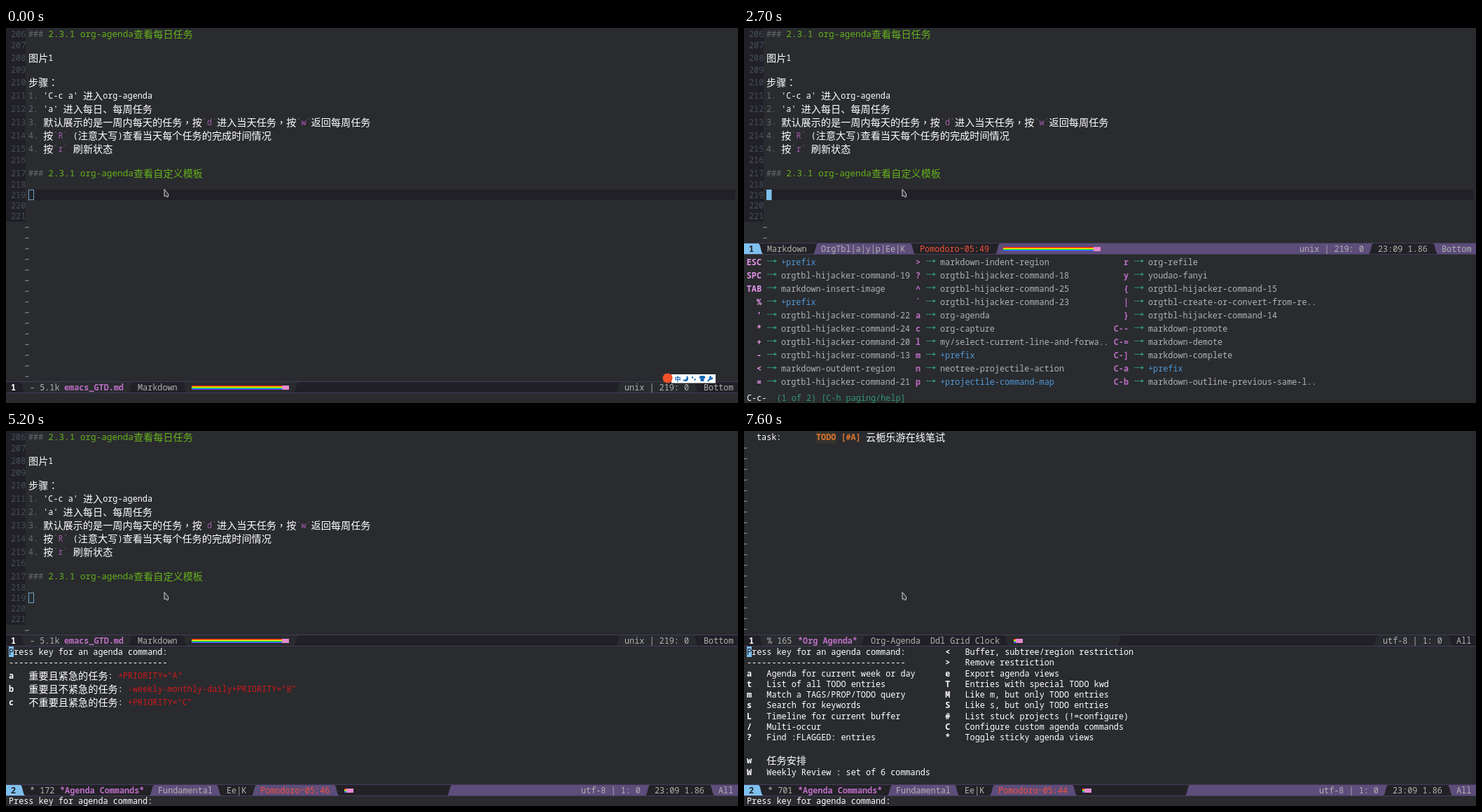
These frames come from a looping animation (1045x536 px, 8 s). An HTML page with a canvas:

```html
<!DOCTYPE html>
<html lang="zh">
<head>
<meta charset="utf-8">
<style>
html, body { margin: 0; width: 100%; height: 100%; overflow: hidden; background: #292b2e; }
canvas { display: block; }
</style>
</head>
<body>
<canvas id="stage" width="1045" height="536"></canvas>
<script>
const ctx = document.getElementById('stage').getContext('2d');
const W = 1045, H = 536, LOOP = 8000, CELL = 7.08, HEADING_CELL = 7.6;
const BG = '#292b2e', DARK = '#212026', WHITE = '#fff', GREY = '#b2b2b2', DIM = '#666a70',
  BLUE = '#7ec0ee', PURPLE = '#5d4d7a', PINK = '#bc6ec5', RED = '#d0181c', GREEN = '#67b11d',
  TEAL = '#2d9574', LINK = '#4f97d7', ORANGE = '#dc752f', TOMATO = '#f2503c';

function rect(x, y, w, h, color) {
  ctx.fillStyle = color;
  ctx.fillRect(x, y, w, h);
}

function shape(points, fill, stroke) {
  ctx.beginPath();
  points.forEach(p => ctx.lineTo(...p));
  ctx.closePath();
  if (fill) { ctx.fillStyle = fill; ctx.fill(); }
  if (stroke) { ctx.strokeStyle = stroke; ctx.lineWidth = 1; ctx.stroke(); }
}

function disc(x, y, r, color) {
  ctx.fillStyle = color;
  ctx.beginPath();
  ctx.arc(x, y, r, 0, 7);
  ctx.fill();
}

// Writes on the terminal grid (wide glyphs take two cells); y is the row centre.
// Full-width commas and colons use the TC face, which centres them.
function text(x, y, str, color = WHITE, bold = false, cell = CELL) {
  ctx.fillStyle = color;
  for (const run of str.match(/[，：]|[\u3000-\u9fff]+|[^\u3000-\u9fff，：]+/g) || []) {
    const wide = run.charCodeAt(0) >= 0x3000;
    const region = /[，：]/.test(run) ? 'TC' : 'SC';
    ctx.font = (bold ? 'bold ' : '') + (wide
      ? `14.16px "Noto Sans CJK ${region}", "Noto Sans CJK", sans-serif`
      : `${cell / 0.6}px "Noto Sans Mono", monospace`);
    ctx.fillText(run, x, y + (wide ? 5 : 4));
    x += run.length * (wide ? 2 * CELL : cell);
  }
  return x;
}

function clipped(y0, y1, draw) {
  ctx.save();
  ctx.beginPath();
  ctx.rect(0, y0, W, y1 - y0);
  ctx.clip();
  draw();
  ctx.restore();
}

function tildes(x, from, to) {
  ctx.strokeStyle = GREY;
  ctx.lineWidth = 1;
  for (let y = from; y <= to; y += 15.23) {
    ctx.beginPath();
    ctx.moveTo(x - 2.5, y + 0.8);
    ctx.bezierCurveTo(x - 1, y - 2, x + 1, y + 2, x + 2.5, y - 0.8);
    ctx.stroke();
  }
}

// ---- markdown buffer ----
const notes = [
  [9, '### 2.3.1 org-agenda查看每日任务'], [25, ''], [43, '图片1'], [60, ''], [78, '步骤：'],
  [97, "1. 'C-c a' 进入org-agenda"], [116, "2. 'a' 进入每日、每周任务"],
  [135, '3. 默认展示的是一周内每天的任务，按`d`进入当天任务，按`w`返回每周任务'],
  [154, '4. 按`R` (注意大写)查看当天每个任务的完成时间情况'], [173, '4. 按`r` 刷新状态'],
  [189, ''], [208, '### 2.3.1 org-agenda查看自定义模板'], [224, ''], [239, ''], [254, ''], [269, '']
];

function noteLine(y, line) {
  const [, mark, body] = line.match(/^(### |\d\. )?(.*)$/);
  let x = text(32, y, mark || '', DIM);
  if (mark === '### ') {
    text(x, y, body, GREEN, false, HEADING_CELL);
    return;
  }
  for (const part of body.split(/(`.`)/)) {
    if (part[0] === '`') {
      x = text(x, y, '`', '#75597b');
      x = text(x, y, part[1], '#a45bad');
      x = text(x, y, '`', '#75597b');
    } else x = text(x, y, part);
  }
}

function notesBuffer(focused, highlight, numbers = true) {
  if (numbers) rect(0, 0, 28, 277, DARK);
  if (highlight) rect(32, 231, 1009, 15, DARK);
  notes.forEach(([y, line], i) => {
    if (numbers) text(7, y, String(206 + i), '#44505c');
    noteLine(y, line);
  });
  if (focused) rect(32, 231, 7.5, 15, BLUE);
  else {
    ctx.strokeStyle = '#6f9fc2';
    ctx.lineWidth = 1;
    ctx.strokeRect(32.5, 231.5, 7, 14);
  }
  if (numbers) tildes(30, 285, 500);
}

// ---- mode lines ----
// Segment: [left edge, ...[x, text, colour, bold]]; shades alternate dark / tinted.
function modeLine(y, active, left, right) {
  const top = y - 7.5, bottom = y + 7.5;
  const shades = active ? ['#222226', PURPLE] : [BG, DARK];
  rect(0, top, W, 15, active ? BLUE : DARK);
  const paint = side => ([edge, ...labels], i) => {
    const lean = (i % 2 ? 3 : -3) * side;
    ctx.fillStyle = shades[i % 2];
    ctx.beginPath();
    ctx.moveTo(edge + lean, top);
    ctx.bezierCurveTo(edge, top + 2, edge, bottom - 2, edge - lean, bottom);
    ctx.lineTo(W, bottom);
    ctx.lineTo(W, top);
    ctx.fill();
    for (const [x, str, color = GREY, bold] of labels) text(x, y, str, color, bold);
  };
  left.forEach(paint(1));
  right.forEach(paint(-1));
  text(7, y, '1', active ? DARK : WHITE, true);
  rect(0, top - 1, W, 1, '#453b5a');
  rect(0, bottom, W, 1, '#453b5a');
}

function progress(x, y, length) {
  ['#f01818', '#ff9a00', '#f4f000', '#30d800', '#0a9cff', '#6a40f0']
    .forEach((color, i) => rect(x, y - 2.5 + i, length, 1, color));
  rect(x + length, y - 2.5, 10, 6, '#e88ad0');
}

const clock = x => [x, '23:09 1.86'];

function notesBarActive(y, timer) {
  modeLine(y, true, [
    [24, [33, 'Markdown']], [102, [110, 'OrgTbl|a|y|p|Ee|K']],
    [241, [251, timer, TOMATO]], [362, [793, 'unix | 219: 0']]
  ], [[895, clock(905)], [987, [996, 'Bottom']]]);
  progress(370, y, 129);
}

function notesBarIdle(y, right) {
  modeLine(y, false, [
    [24, [34, '- 5.1k'], [83, 'emacs_GTD.md', PINK, true]],
    [178, [188, 'Markdown']], [255], [414]
  ], right || [[874, [883, 'unix | 219: 0']], [985, [996, 'Bottom']]]);
  progress(265, y, 129);
}

function secondBar(left) {
  const rest = left[left.length - 1];
  modeLine(513.5, true, [...left.slice(0, -1), [...rest, [821, 'utf-8 | 1: 0']]],
    [[916, clock(926)], [1008, [1017, 'All']]]);
  rect(5, 507, 12, 13, BLUE);
  text(7, 513.5, '2', DARK, true);
}

function commandsBar(size, timer) {
  secondBar([
    [24, [34, '* ' + size], [77, '*Agenda Commands*', PINK, true]], [208, [217, 'Fundamental']],
    [304, [315, 'Ee|K']], [354, [363, timer, TOMATO]], [472], [633]
  ]);
  progress(483, 513.5, 3);
  text(4, 529, 'Press key for agenda command:');
}

// ---- key hints ----
const hijack = n => 'orgtbl-hijacker-command-' + n;
const hints = [
  [25, 53, '#e394e6', [['ESC', '+prefix'], ['SPC', hijack(19)], ['TAB', 'markdown-insert-image'],
    ['%', '+prefix'], ["'", hijack(22)], ['*', hijack(24)], ['+', hijack(20)], ['-', hijack(13)],
    ['<', 'markdown-outdent-region'], ['=', hijack(21)]]],
  [252, 280, PINK, [['>', 'markdown-indent-region'], ['?', hijack(18)], ['^', hijack(25)],
    ['`', hijack(23)], ['a', 'org-agenda'], ['c', 'org-capture'],
    ['l', 'my/select-current-line-and-forwa..'], ['m', '+prefix'],
    ['n', 'neotree-projectile-action'], ['p', '+projectile-command-map']]],
  [549, 577, PINK, [['r', 'org-refile'], ['y', 'youdao-fanyi'], ['{', hijack(15)],
    ['|', 'orgtbl-create-or-convert-from-re..'], ['}', hijack(14)], ['C--', 'markdown-promote'],
    ['C-=', 'markdown-demote'], ['C-]', 'markdown-complete'], ['C-a', '+prefix'],
    ['C-b', 'markdown-outline-previous-same-l..']]]
];

function keyHints() {
  for (const [keyEnd, x, keyColor, rows] of hints) {
    rows.forEach(([key, command], i) => {
      const y = 334.5 + i * 19.05;
      text(keyEnd - key.length * CELL, y, key, keyColor, true);
      rect(x - 20, y - 2, 12, 1, TEAL);
      shape([[x - 10, y - 4], [x - 6, y - 1.5], [x - 10, y + 1]], TEAL);
      text(x, y, command, command[0] === '+' ? LINK : GREY);
    });
  }
  text(46.5, 529, '(1 of 2) [C-h paging/help]', TEAL);
}

// ---- agenda windows ----
function blockCursor(y, letter, bold) {
  rect(4, y - 7.5, 7, 15, BLUE);
  text(4, y, letter, DARK, bold);
}

function commandHeader() {
  text(4, 315.5, 'Press key for an agenda command:');
  blockCursor(315.5, 'P');
  text(4, 331, '-'.repeat(32));
}

const menu = [
  ['a', 'Agenda for current week or day'], ['t', 'List of all TODO entries'],
  ['m', 'Match a TAGS/PROP/TODO query'], ['s', 'Search for keywords'],
  ['L', 'Timeline for current buffer'], ['/', 'Multi-occur'], ['?', 'Find :FLAGGED: entries']
];
const sideMenu = [
  ['<', 'Buffer, subtree/region restriction'], ['>', 'Remove restriction'],
  ['e', 'Export agenda views'], ['T', 'Entries with special TODO kwd'],
  ['M', 'Like m, but only TODO entries'], ['S', 'Like s, but only TODO entries'],
  ['#', 'List stuck projects (!=configure)'], ['C', 'Configure custom agenda commands'],
  ['*', 'Toggle sticky agenda views']
];

function entry(x, y, [key, label]) {
  text(x, y, key, WHITE, true);
  return text(x + 4 * CELL, y, label);
}

function commandMenu(timer) {
  commandHeader();
  menu.forEach((item, i) => entry(4, 346.5 + i * 15.25, item));
  sideMenu.forEach((item, i) => entry(287.2, 316 + i * 15.25, item));
  entry(4, 471, ['w', '任务安排']);
  entry(4, 487.5, ['W', 'Weekly Review : set of 6 commands']);
  commandsBar(701, timer);
}

function priorityMenu(timer) {
  commandHeader();
  [['a', '重要且紧急的任务: ', '+PRIORITY="A"'],
   ['b', '重要且不紧急的任务: ', '-weekly-monthly-daily+PRIORITY="B"'],
   ['c', '不重要且紧急的任务: ', '+PRIORITY="C"']].forEach(([key, label, query], i) => {
    const y = 349.5 + i * 19;
    text(entry(4, y, [key, label]), y, query, RED);
  });
  commandsBar(172, timer);
}

function task(y, title) {
  text(18, y, 'task:');
  rect(103, y - 9, 28.5, 18, '#37332d');
  text(103, y, 'TODO [#A]', ORANGE, true);
  text(174, y, title);
}
const tasks = ['禾岚面试(先网站填写简历)', '云栀乐游在线笔试'];

function agendaList(timer) {
  rect(4, 232, 1037, 15, DARK);
  text(text(4, 239.5, 'Headlines with TAGS match: ', PINK, true), 239.5, '+PRIORITY="A"', RED);
  blockCursor(239.5, 'H', true);
  text(4, 254.5, 'Press ‘C-u r’ to search again with new search string', PINK, true);
  tasks.forEach((title, i) => task(273 + i * 19, title));
  tildes(2, 308, 495);
  secondBar([
    [24, [33, 'Org-Agenda  Ddl Grid Clock']], [229, [238, 'y|Ee|K']],
    [290, [301, timer, TOMATO]], [410]
  ]);
  progress(420, 513.5, 3);
}

function agendaAbove() {
  task(9, tasks[1]);
  tildes(2, 24.5, 290);
  modeLine(299.5, false, [
    [24, [33, '% 165'], [77, '*Org Agenda*', PINK, true]],
    [170, [181, 'Org-Agenda  Ddl Grid Clock']], [375], [536]
  ], [[902, [912, 'utf-8 | 1: 0']], [1008, [1017, 'All']]]);
  progress(385, 299.5, 3);
}

// ---- overlays ----
function arrowPointer() {
  shape([[226, 230.5], [226, 240.5], [228.5, 239.5], [230, 242], [231.5, 241], [231.5, 237]],
    '#303236', '#d8d8d8');
}

function handPointer() {
  shape([[225.5, 231], [227.5, 231], [228, 235], [232.5, 236.5], [232, 241.5], [226, 241.5],
    [222.5, 237], [225.5, 237.5]], '#303236', '#d8d8d8');
}

function inputBar() {
  const ink = '#1668b8';
  rect(950, 495, 63, 12.5, WHITE);
  disc(944.5, 500.5, 7, '#f0502a');
  ctx.fillStyle = ink;
  ctx.font = 'bold 9px "Noto Sans CJK SC", sans-serif';
  ctx.fillText('中', 954.5, 504.5);
  disc(970, 501, 4, ink);
  disc(968, 499, 3.7, WHITE);
  disc(980, 499.5, 1.3, ink);
  disc(983.5, 502.5, 1.2, ink);
  shape([[990, 498], [992, 497], [996, 497], [998, 498], [998, 501], [996.5, 501],
    [996.5, 505], [991.5, 505], [991.5, 501], [990, 501]], ink);
  shape([[1001, 504], [1004.5, 500.5], [1006, 502], [1002.5, 505.5]], ink);
  disc(1006.5, 500, 2.7, ink);
  disc(1008, 498.5, 1.3, WHITE);
}

// ---- timeline ----
const ticks = [1000, 2600, 3500, 4300, 4900, 5900, 7000];

function draw(t) {
  const timer = 'Pomodoro~05:' + (51 - ticks.filter(at => t >= at).length);
  rect(0, 0, W, H, BG);
  if (t < 2900) {
    const focused = t >= 200, popup = t >= 1400;
    clipped(0, popup ? 307 : 505, () => notesBuffer(focused, true));
    if (focused) notesBarActive(popup ? 315.5 : 513.5, timer);
    else notesBarIdle(513.5);
    if (t >= 1300) text(4, 529, 'C-c-');
    if (popup) keyHints();
    if (t < 1700) inputBar();
  } else if (t < 5900) {
    clipped(0, 291, () => notesBuffer(false, false));
    notesBarIdle(299.5);
    (t < 4000 ? commandMenu : priorityMenu)(timer);
  } else if (t < 7000) {
    rect(0, 0, 7, 215, DARK);
    clipped(0, 215, () => {
      ctx.translate(-21, -35);
      notesBuffer(false, false, false);
    });
    notesBarIdle(223.5, [[881, [890, 'unix | 219: 0']], [994, [1003, '97%']], [1030]]);
    ctx.strokeStyle = '#8a8a8e';
    ctx.lineWidth = 1;
    ctx.strokeRect(188.5, 216.5, 56, 14);
    agendaList(timer);
  } else {
    agendaAbove();
    commandMenu(timer);
  }
  (t >= 5900 && t < 7000 ? handPointer : arrowPointer)();
}

const start = performance.now();
function frame() {
  draw((performance.now() - start) % LOOP);
  requestAnimationFrame(frame);
}
frame();
</script>
</body>
</html>
```
